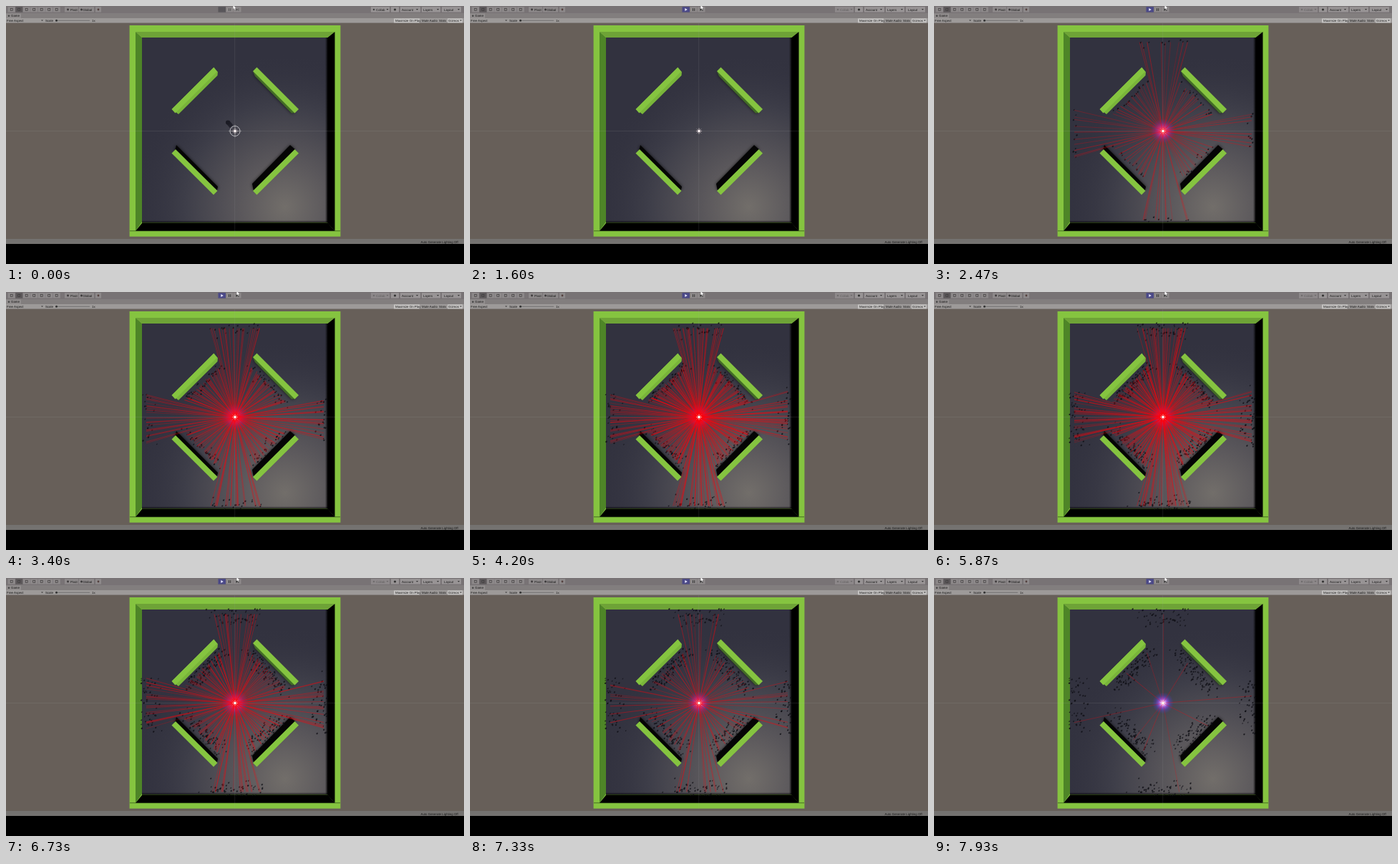
Write an HTML page with a canvas that moves like this. It is 640 by 360 pixels and loops after 8 s.

```html
<!DOCTYPE html>
<html lang="en">
<head>
<meta charset="utf-8">
<title>Ray scatter</title>
<style>
  html, body { margin: 0; width: 100%; height: 100%; overflow: hidden; background: #000; }
  canvas { display: block; width: 100vw; height: 100vh; }
</style>
</head>
<body>
<canvas id="stage" width="640" height="360"></canvas>
<script>
const stage = document.getElementById('stage');
const scene = document.createElement('canvas');
scene.width = 640;
scene.height = 360;
let ctx = scene.getContext('2d');

const LOOP = 8000, STEP = 1000 / 15;
const CX = 320, CY = 174.5;
const FIRE_START = 1840, FIRE_END = 5500, RAY_LIFE = 2500, RAY_COUNT = 550;
const GREEN = '#85c440', BAR = '#787375', BUTTON = '#8d898a';

function rect(x, y, w, h, fill) {
  ctx.fillStyle = fill;
  ctx.fillRect(x, y, w, h);
}

function poly(fill, ...p) {
  ctx.beginPath();
  for (let i = 0; i < p.length; i += 2) ctx.lineTo(p[i], p[i + 1]);
  ctx.closePath();
  ctx.fillStyle = fill;
  ctx.fill();
}

function line(x1, y1, x2, y2, color, width = 1) {
  ctx.beginPath();
  ctx.moveTo(x1, y1);
  ctx.lineTo(x2, y2);
  ctx.strokeStyle = color;
  ctx.lineWidth = width;
  ctx.stroke();
}

function disc(x, y, r, fill) {
  ctx.beginPath();
  ctx.arc(x, y, r, 0, 7);
  ctx.fillStyle = fill;
  ctx.fill();
}

function label(text, x, y, color = '#151515') {
  ctx.font = '4.4px "Liberation Sans", Arial, sans-serif';
  ctx.textRendering = 'geometricPrecision';
  ctx.fillStyle = color;
  ctx.fillText(text, x, y);
}

function radial(x, y, r, stops) {
  const g = ctx.createRadialGradient(x, y, 0, x, y, r);
  stops.forEach(([at, color]) => g.addColorStop(at, color));
  return g;
}

function linear(x1, y1, x2, y2, from, to) {
  const g = ctx.createLinearGradient(x1, y1, x2, y2);
  g.addColorStop(0, from);
  g.addColorStop(1, to);
  return g;
}

function dropdown(text, x, y, right) {
  label(text, x, y);
  poly('#333', right - 3, y - 2.4, right, y - 2.4, right - 1.5, y - 0.7);
}

function drawEditor() {
  rect(0, 0, 640, 10, BAR);
  rect(0, 10, 640, 7, '#827e7e');
  rect(0, 10.5, 21, 6.5, '#918d8d');
  rect(0, 17, 640, 7, '#9d9a99');
  rect(0, 23.5, 640, 0.7, '#6c6663');

  for (let i = 0; i < 7; i++) {
    const x = 2.7 + i * 10.5;
    rect(x, 1.2, 10.1, 7.4, i === 1 ? '#5c585a' : BUTTON);
    ctx.strokeStyle = '#3c3a3b';
    ctx.lineWidth = 0.7;
    ctx.strokeRect(x + 3.5, 3.3, 3, 3);
  }
  rect(82, 1.2, 19, 7.4, BUTTON);
  rect(102, 1.2, 21, 7.4, BUTTON);
  rect(125, 1.2, 8, 7.4, BUTTON);
  disc(86.5, 5, 1.4, '#3c3a3b');
  disc(105.5, 5, 1.5, '#3c3a3b');
  disc(129, 5, 1.4, '#54413f');
  label('Pivot', 90, 6.5);
  label('Global', 107.5, 6.5);

  [[510, 26], [538, 11], [551, 28], [581, 26], [609, 27]]
    .forEach(([x, w]) => rect(x, 1.2, w, 7.4, '#989495'));
  disc(543.5, 5, 1.6, '#333');
  dropdown('Account', 553, 6.5, 576);
  dropdown('Layers', 583, 6.5, 605);
  dropdown('Layout', 612, 6.5, 634);

  disc(4, 13.8, 1.3, '#444');
  label('Game', 7, 15.3);
  dropdown('Free Aspect', 1, 21.8, 52);
  label('Scale', 55, 21.8);
  rect(69, 19.8, 48, 0.8, '#666');
  disc(70.5, 20.2, 1.5, '#333');
  label('1x', 120, 21.8);
  rect(542, 17.4, 36, 6, '#c4c2c1');
  label('Maximize On Play', 544, 21.8);
  label('Mute Audio', 581, 21.8);
  label('Stats', 605, 21.8);
  rect(617, 17.4, 21, 6, '#c4c2c1');
  dropdown('Gizmos', 618, 21.8, 637);
}

function drawArena() {
  rect(0, 24, 640, 301, '#675f59');
  rect(0, 325, 640, 7, '#747270');
  label('Auto Generate Lighting Off', 579.5, 330.9);
  rect(0, 332, 640, 28, '#000');

  rect(172.6, 27, 294.8, 294.7, GREEN);
  rect(190, 44, 260, 258, '#32323f');
  rect(190, 44, 260, 258, radial(390, 280, 215, [
    [0, '#726e6a'], [0.3, '#5a575b'], [0.65, '#3e3e49'], [1, 'rgba(50,50,63,0)']
  ]));

  // Inner wall faces and the soft shadows they cast.
  rect(446, 44, 4, 258, linear(446, 0, 450, 0, 'rgba(0,0,0,0)', '#000'));
  rect(190, 299, 260, 6, linear(0, 299, 0, 304, 'rgba(0,0,0,0)', '#000'));
  poly('#4e8527', 181, 36, 190, 44, 190, 301, 181, 314);
  poly('#6ea337', 181, 36, 459, 36, 449, 44, 190, 44);
  poly('#000', 459.5, 36, 459.5, 314, 449.5, 303, 449.5, 44);
  poly('#000', 181, 314, 190, 303, 450, 303, 459.5, 314);
  line(173, 313.8, 467, 313.8, '#2f4717', 0.7);

  // Four diagonal barriers.
  ctx.shadowColor = 'rgba(0,0,0,.7)';
  ctx.shadowBlur = 4;
  poly('#050505', 238, 194, 296, 252, 295, 257, 236, 202);
  poly('#050505', 344, 248, 397, 194, 404, 200, 346, 258);
  poly('#426c26', 345, 91, 348, 98, 399, 149.5, 404, 149);
  ctx.shadowBlur = 0;
  poly('#79b53a', 290, 86, 296, 92, 295.5, 97, 241, 151, 232, 144);
  poly(GREEN, 231.5, 144, 290.5, 85.5, 295, 91.5, 236.5, 149.5);
  poly(GREEN, 345, 91, 350.5, 85.5, 409, 144, 403.5, 149.5);
  poly(GREEN, 231.5, 205.5, 237, 200, 295.5, 258, 290, 263.5);
  poly(GREEN, 345, 258, 403.5, 200, 409, 205.5, 350.5, 263.5);

  line(0, 174.5, 640, 174.5, 'rgba(165,165,170,.2)', 0.7);
  line(319.7, 24, 319.7, 322, 'rgba(165,165,170,.2)', 0.7);
}

function seededRandom(seed) {
  return () => {
    seed = (seed * 1664525 + 1013904223) % 4294967296;
    return seed / 4294967296;
  };
}

// Rays end on a barrier (a diamond) unless they leave through one of four gaps.
// Golden-ratio steps with a little jitter spread them evenly around the circle.
function makeRay(random, i) {
  const angle = (i * 0.618034 + random() * 0.02) * Math.PI * 2;
  const ux = Math.cos(angle), uy = Math.sin(angle);
  const ax = Math.abs(ux), ay = Math.abs(uy);
  const open = Math.min(ax, ay) / Math.max(ax, ay) < 0.295;
  const reach = open ? 124 / Math.max(ax, ay) : (95 - random() * 5) / (ax + ay);
  return {
    open,
    x: ux * reach,
    y: uy * reach,
    born: FIRE_START + (i + random()) / RAY_COUNT * (FIRE_END - FIRE_START),
    driftX: (random() + random() - 1) * 18 - ux * 4,
    driftY: (random() + random() - 1) * 18 - uy * 4,
    alpha: 0.4 + random() * 0.4,
    size: 0.6 + random() * 0.5
  };
}

const random = seededRandom(71);
const rays = Array.from({ length: RAY_COUNT }, (_, i) => makeRay(random, i));

function drawPellet(ray, t) {
  const settle = 1 - Math.exp(-(t - ray.born) / 900);
  let x = ray.x + ray.driftX * settle;
  let y = ray.y + ray.driftY * settle;
  if (ray.open) {
    x = Math.max(-131, Math.min(129, x));
    y = Math.max(-131, Math.min(129, y));
  } else {
    const fit = Math.min(1, 98 / (Math.abs(x) + Math.abs(y)));
    x *= fit;
    y *= fit;
  }
  disc(CX + x + 0.6, CY + y - 0.7, ray.size, 'rgba(0,0,0,.35)');
  disc(CX + x, CY + y, ray.size, 'rgba(16,16,23,.85)');
}

function drawSun() {
  for (let i = 0; i < 8; i++) {
    const c = Math.cos(i * Math.PI / 4), s = Math.sin(i * Math.PI / 4);
    line(CX + c * 2.6, CY + s * 2.6, CX + c * 4, CY + s * 4, '#f4e4e4', 0.8);
  }
  disc(CX, CY, 2, '#f8f0f0');
}

function drawIdleGizmo() {
  line(310, 162, 315, 168, '#20202a', 6);
  disc(310, 162.5, 3, '#1b1b24');
  ctx.beginPath();
  ctx.arc(CX, CY, 7, 0, 7);
  ctx.strokeStyle = '#c8c8cc';
  ctx.lineWidth = 0.9;
  ctx.stroke();
  line(CX - 9, CY, CX + 9, CY, '#aaa', 0.6);
  line(CX, CY - 9, CX, CY + 9, '#aaa', 0.6);
}

function drawControls(t) {
  const playing = t >= 400, ready = t >= 1600;
  rect(296.5, 1.2, 10.5, 7.4, playing ? '#4b4987' : '#59565a');
  rect(307.5, 1.2, 10, 7.4, BUTTON);
  rect(318, 1.2, 10.5, 7.4, BUTTON);
  if (playing) poly('#e4e4fa', 300.3, 3, 300.3, 7, 303.8, 5);
  const icon = ready ? '#333' : '#555';
  rect(311, 3.2, 1, 3.8, icon);
  rect(313.2, 3.2, 1, 3.8, icon);
  poly(icon, 321.5, 3.2, 321.5, 7, 324.3, 5.1);
  rect(324.6, 3.2, 0.8, 3.8, icon);

  disc(514, 5, 1.3, '#444');
  dropdown('Collab', 517, 6.5, 534.5);
  if (ready) rect(510, 1.2, 26, 7.4, 'rgba(135,131,132,.65)');

  const k = Math.min(1, t / 670);
  const x = 317.5 + 5 * k * k * (3 - 2 * k);
  poly('#fff', x, -1, x, 4, x + 1.2, 3, x + 2.2, 5, x + 3, 4.6, x + 2.1, 2.7, x + 3.6, 2.6);
}

drawEditor();
drawArena();
ctx = stage.getContext('2d');

function draw(t) {
  ctx.drawImage(scene, 0, 0);
  drawControls(t);
  if (t < 400) drawIdleGizmo();

  const fired = rays.filter(ray => ray.born <= t);
  fired.forEach(ray => drawPellet(ray, t));
  if (fired.length) {
    const pulse = 17 + 2 * Math.sin(t / 130);
    disc(CX, CY, pulse, radial(CX, CY, pulse, [
      [0, '#fff'], [0.2, '#d9a0ff'], [0.45, 'rgba(150,75,225,.75)'],
      [0.7, 'rgba(85,65,200,.4)'], [1, 'rgba(70,60,190,0)']
    ]));
  }
  fired.filter(ray => t < ray.born + RAY_LIFE).forEach(ray =>
    line(CX, CY, CX + ray.x, CY + ray.y, `rgba(250,4,12,${ray.alpha})`, 0.55));
  drawSun();
}

function tick() {
  const t = performance.now() % LOOP;
  draw(Math.floor((t + 5) / STEP) * STEP);
  requestAnimationFrame(tick);
}
tick();
</script>
</body>
</html>
```
